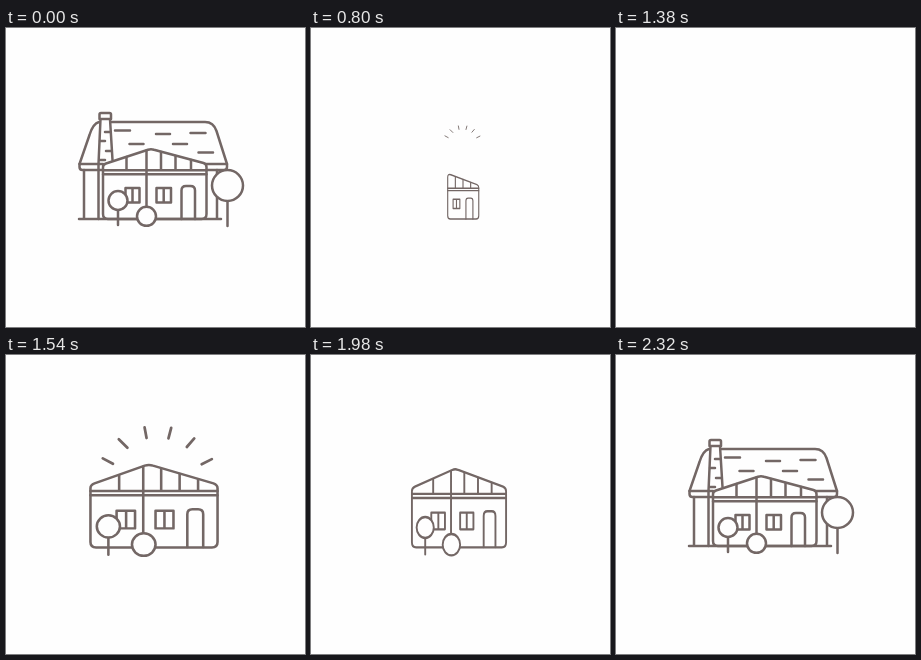
These frames come from a looping animation (299 by 299 pixels, 2.54 s). An HTML page:

```html
<!DOCTYPE html>
<html lang="en">
<head>
<meta charset="utf-8">
<title>Growing house</title>
<style>
  html, body { margin: 0; width: 100%; height: 100%; overflow: hidden; background: #fefefe; }
  svg { display: block; width: 100vw; height: 100vh; }
  svg g { fill: none; stroke: #736765; stroke-linecap: round; stroke-linejoin: round; }
  .solid { fill: #fefefe; }
</style>
</head>
<body>
<svg viewBox="0 0 299 299">
  <defs>
    <path id="burst" d="M-70 -8.5L-57 -1.5M-49.5 -33L-38.5 -22M-16.5 -48L-14 -34.5M17.5 -47.5L14 -34M47 -34L37.5 -23M69.5 -7.5L56.5 -1"/>
  </defs>

  <g id="small" stroke-width="2.5">
    <path d="M118 115Q118 108.500 125 110.500L183 128.500Q187 130 187 134V185Q187 191 181 191H124Q118 191 118 185Z"/>
    <path d="M118 135H187M118 139.500H187M135 114V135M152 119V135M169 124.500V135"/>
    <path d="M130 155H145V172H130ZM137.500 155V172"/>
    <path d="M158.500 191V158Q158.500 153 163.500 153H169Q174 153 174 158V191"/>
  </g>

  <g id="medium" stroke-width="2.5">
    <path d="M86 134V132Q86 128.500 90 127L139 109Q143 107.500 147 109L206 127Q210 128.500 210 132V187Q210 192.500 204.500 192.500H91.500Q86 192.500 86 187Z"/>
    <path d="M86 134.800H210M86 139.200H210M114 119V134M155 112V134M173 117.500V134M191 123V134M137.500 110V179"/>
    <path d="M111.500 155H129.500V173H111.500ZM120.800 155V173M149.500 155H167V173H149.500ZM158.200 155V173"/>
    <path d="M180.500 192V158.500Q180.500 153.500 185.500 153.500H191Q196 153.500 196 158.500V192"/>
    <path d="M103.500 182V200"/>
    <circle class="solid" cx="103.500" cy="171" r="11.300"/>
    <circle class="solid" cx="138" cy="189.500" r="11.500"/>
  </g>

  <g id="large" stroke-width="2.500">
    <path d="M73 191H215M78 142V191M211 142V191"/>
    <path d="M73.500 136L83.500 107Q87 95.500 93 94M105 94H199Q207.500 94 210.500 103L221 136"/>
    <path d="M97 136H73.500V139Q73.500 142 76.500 142H97M200 136H221V139Q221 142 218 142H200"/>
    <path d="M94.500 91L92.500 136V191M104 91L106.500 132M93.500 91V86.500Q93.500 85 95 85H103.500Q105 85 105 86.500V91Z"/>
    <path d="M99 104H104M94 113H99M100 123H105M94 132H99"/>
    <path d="M109 102.500H124M150 106H164M184.500 105H199.500M123.500 116H137.500M167 116H181M192.500 124.500H207"/>
    <path d="M97 142V139Q97 136.500 100 135.500L142 121.700Q145 120.700 148 121.700L197.500 135Q200.500 136 200.500 139V186Q200.500 191 195.500 191H102Q97 191 97 186Z"/>
    <path d="M97 142.300H200.500M97 146.300H200.500M120.500 129V142M155 124V142M169.500 128V142M185 132V142M140.500 122.500V179"/>
    <path d="M119.500 160H133.500V174.500H119.500ZM126.500 160V174.500M150.500 160H165V174.500H150.500ZM157.700 160V174.500"/>
    <path d="M175.500 191V162.500Q175.500 158 180 158H184.500Q189 158 189 162.500V191"/>
    <path d="M112 182V197M221.500 173V198"/>
    <circle class="solid" cx="112" cy="172.500" r="9.500"/>
    <circle class="solid" cx="140.500" cy="188.300" r="9.500"/>
    <circle class="solid" cx="221.500" cy="157.500" r="15.500"/>
  </g>

  <g id="rays" stroke-width="3.500"><use href="#burst"/></g>
</svg>
<script>
const LOOP = 2540, STEP = 20, POP = 260, SHRINK = 160, RAYS_OUT = 180;
const byId = id => document.getElementById(id);
const rays = byId("rays");

const houses = [
  { el: byId("small"), enter: 760, leave: 1220, base: [152, 191], burst: [151.5, 110], reach: 1 },
  { el: byId("medium"), enter: 1420, leave: 1880, base: [148, 192], burst: [151.5, 110], reach: 1.09 },
  { el: byId("large"), enter: 2060, leave: 2540, base: [144, 191], burst: [145.5, 79], reach: 0.96 }
];

// Each pose: time, horizontal scale, vertical scale.
const popPoses = [[0, 0, 0], [20, 0, 0], [60, 0.9, 1.1], [100, 1.08, 0.92], [140, 0.97, 1.04], [180, 1, 1]];
const shrinkPoses = [[0, 1, 1], [40, 1.1, 0.9], [80, 0.9, 1.1], [SHRINK, 0, 0]];

function poseAt(poses, t) {
  const next = poses.findIndex(pose => pose[0] > t);
  if (next < 0) return poses[poses.length - 1].slice(1);
  const a = poses[next - 1], b = poses[next];
  const u = (t - a[0]) / (b[0] - a[0]);
  const k = u * u * (3 - 2 * u);
  return [a[1] + (b[1] - a[1]) * k, a[2] + (b[2] - a[2]) * k];
}

function place(el, [x, y], [sx, sy], [ox, oy] = [0, 0]) {
  const shown = sx > 0.01;
  el.setAttribute("visibility", shown ? "visible" : "hidden");
  if (shown) el.setAttribute("transform", `translate(${x} ${y}) scale(${sx} ${sy}) translate(${-ox} ${-oy})`);
}

function render(time) {
  const now = Math.floor((time % LOOP) / STEP) * STEP;
  rays.setAttribute("visibility", "hidden");
  for (const { el, enter, leave, base, burst, reach } of houses) {
    const age = (now - enter + LOOP) % LOOP;
    const stay = leave - enter;
    const scale = age < stay ? poseAt(popPoses, age) : poseAt(shrinkPoses, age - stay);
    place(el, base, scale, base);
    if (age > STEP && age < POP) {
      const size = reach * (1 - Math.pow(1 - Math.min(1, age / RAYS_OUT), 1.15));
      place(rays, burst, [size, size]);
      rays.setAttribute("opacity", Math.min(1, (POP - age) / (POP - RAYS_OUT)));
    }
  }
}

const start = performance.now();
function tick() {
  render(performance.now() - start);
  requestAnimationFrame(tick);
}
tick();
</script>
</body>
</html>
```
